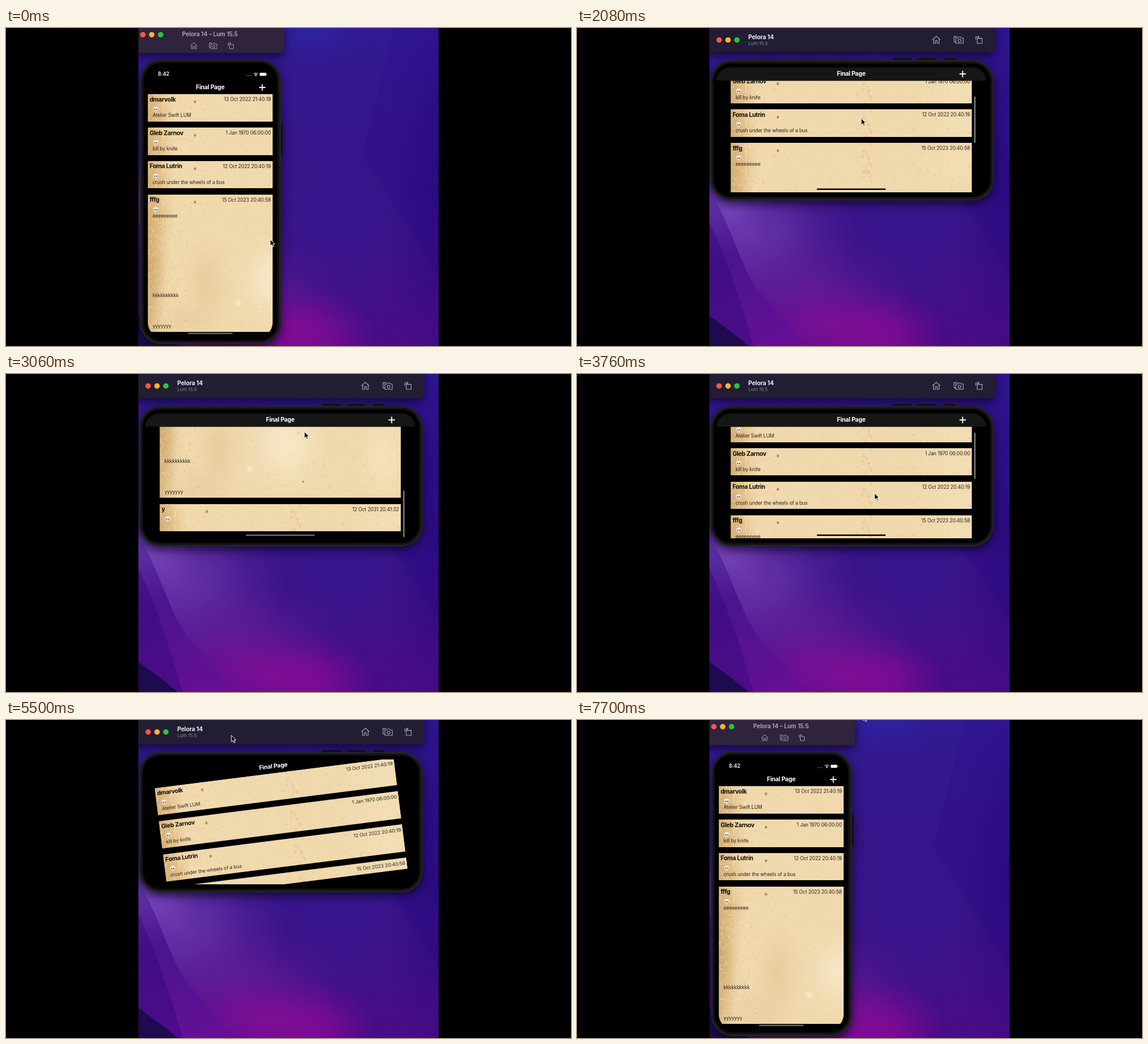
An HTML page with a canvas for the animation above (7800 ms loop, 960x540 px).

```html
<!DOCTYPE html>
<html lang="en">
<head>
<meta charset="utf-8">
<title>Simulator rotation</title>
<style>
html, body { margin: 0; width: 100%; height: 100%; overflow: hidden; background: #000; }
canvas { display: block; width: 960px; height: 540px; }
</style>
</head>
<body>
<canvas id="stage" width="960" height="540"></canvas>
<script>
const ctx = document.getElementById('stage').getContext('2d');
const LOOP = 7800, FONT = 'Inter, "Liberation Sans", sans-serif';
const WHITE = '#fff', INK = '#2a241b', HOME = '#6c6c6c';
const lerp = (a, b, p) => a + (b - a) * p;
const ease = x => (1 - Math.cos(Math.PI * Math.min(1, Math.max(0, x)))) / 2;
const glide = x => 1 - (1 - Math.min(1, Math.max(0, x))) ** 3;

// Interpolate rows of [time, value, value...]
function track(keys, t) {
  let i = 0;
  while (i < keys.length - 2 && t >= keys[i + 1][0]) i++;
  const a = keys[i], b = keys[i + 1];
  const p = ease((t - a[0]) / (b[0] - a[0]));
  return a.slice(1).map((v, k) => lerp(v, b[k + 1], p));
}

function layer(w, h, scale, paint) {
  const c = document.createElement('canvas');
  c.width = w * scale;
  c.height = h * scale;
  const g = c.getContext('2d');
  g.scale(scale, scale);
  paint(g);
  return c;
}

function blob(g, x, y, rx, ry, rgb, alpha) {
  g.save();
  g.translate(x, y);
  g.scale(rx, ry);
  const f = g.createRadialGradient(0, 0, 0, 0, 0, 1);
  [1, .75, .28, 0].forEach((k, i) => f.addColorStop(i / 3, `rgba(${rgb},${alpha * k})`));
  g.fillStyle = f;
  g.fillRect(-1, -1, 2, 2);
  g.restore();
}

function rounded(g, x, y, w, h, r, fill) {
  g.beginPath();
  g.roundRect(x, y, w, h, r);
  g.fillStyle = fill;
  g.fill();
}

function text(s, x, y, size, weight, color, align = 'left', spacing = -.12) {
  ctx.font = `${weight} ${size}px ${FONT}`;
  ctx.letterSpacing = spacing + 'px';
  ctx.textAlign = align;
  ctx.textBaseline = 'middle';
  ctx.fillStyle = color;
  ctx.fillText(s, x, y);
}

const wallpaper = layer(960, 540, 1, g => {
  g.beginPath();
  g.rect(225, 0, 510, 540);
  g.clip();
  const base = g.createLinearGradient(0, 0, 0, 540);
  base.addColorStop(0, '#321a92');
  base.addColorStop(.5, '#361387');
  base.addColorStop(1, '#480b86');
  g.fillStyle = base;
  g.fillRect(225, 0, 510, 540);
  [
    [515, 0, 110, 60, '44,38,170', .6],
    [570, 330, 180, 200, '54,24,146', .6],
    [290, 350, 190, 150, '116,62,178', .75],
    [250, 300, 80, 70, '134,82,200', .6],
    [390, 440, 190, 90, '104,32,152', .65],
    [440, 510, 190, 85, '140,16,152', .75],
    [520, 530, 110, 80, '140,10,150', .6],
    [735, 270, 90, 330, '40,8,124', .6]
  ].forEach(b => blob(g, ...b));
  g.fillStyle = 'rgba(36,4,130,.16)';
  g.beginPath();
  g.moveTo(660, 0);
  g.lineTo(605, 215);
  g.lineTo(735, 420);
  g.lineTo(735, 0);
  g.fill();
  const ridge = g.createLinearGradient(225, 280, 330, 540);
  ridge.addColorStop(0, '#6034a8');
  ridge.addColorStop(.4, '#4a1490');
  ridge.addColorStop(1, '#640f96');
  g.fillStyle = ridge;
  g.beginPath();
  g.moveTo(225, 278);
  g.bezierCurveTo(265, 335, 280, 425, 325, 465);
  g.quadraticCurveTo(355, 500, 385, 540);
  g.lineTo(225, 540);
  g.fill();
  g.fillStyle = 'rgba(52,8,118,.45)';
  g.beginPath();
  g.moveTo(225, 330);
  g.quadraticCurveTo(260, 400, 300, 540);
  g.lineTo(225, 540);
  g.fill();
  g.fillStyle = '#1d0a50';
  g.beginPath();
  g.moveTo(225, 489);
  g.quadraticCurveTo(255, 510, 292, 540);
  g.lineTo(225, 540);
  g.fill();
});

const paper = layer(412, 236, 2, g => {
  let seed = 7;
  const rnd = () => (seed = seed * 16807 % 2147483647) / 2147483647;
  g.fillStyle = '#f0d9ad';
  g.fillRect(0, 0, 412, 236);
  [
    [215, 145, 75, 85, '248,234,202', .9],
    [380, 165, 50, 80, '246,230,192', .75],
    [385, 30, 75, 70, '244,226,186', .6],
    [100, 150, 42, 85, '226,196,144', .5],
    [65, 215, 70, 45, '228,198,148', .45],
    [8, 120, 32, 110, '206,168,108', .6],
    [18, 35, 30, 60, '222,180,118', .6],
    [153, 184, 8, 8, '250,238,208', .9],
    [80, 13, 3, 3.5, '128,86,36', .9],
    [244, 206, 2.5, 2.5, '150,110,60', .9],
    [305, 90, 2.5, 3, '170,125,70', .7]
  ].forEach(b => blob(g, ...b));
  const edge = g.createLinearGradient(0, 0, 30, 0);
  edge.addColorStop(0, 'rgba(190,142,76,.5)');
  edge.addColorStop(1, 'rgba(220,180,120,0)');
  g.fillStyle = edge;
  g.fillRect(0, 0, 30, 236);
  g.fillStyle = 'rgba(250,232,196,.5)';
  g.fillRect(25, 0, 1.2, 60);
  for (let i = 0; i < 1800; i++) {
    const near = rnd() < .4;
    const x = near ? 65 * rnd() ** 2 : rnd() * 412;
    const tone = ['212,172,110', '250,236,204', '230,196,150'][i % 3];
    g.fillStyle = `rgba(${tone},${near ? .3 : .25})`;
    g.fillRect(x, rnd() * 236, 1 + rnd() * 2, 1 + rnd() * 2.5);
  }
  for (let i = 0; i < 18; i++) {
    blob(g, 222 + rnd() * 18, rnd() * 65, 2 + rnd() * 2, 2 + rnd() * 3, '220,184,124', .5);
  }
});

const rows = [
  ['dmarvolk', '13 Oct 2022 21:40:19', ['Atelier Swift LUM']],
  ['Gleb Zarnov', '1 Jan 1970 06:00:00', ['kill by knife']],
  ['Foma Lutrin', '12 Oct 2022 20:40:19', ['crush under the wheels of a bus']],
  ['fffg', '15 Oct 2023 20:40:58', ['eeeeeeeee', 'kkkkkkkkkk', 'yyyyyyy']],
  ['y', '12 Oct 2031 20:41:32', []]
];
const NOTE_Y = [36.5, 171.5, 223.5];

function skull(x, y) {
  rounded(ctx, x - 4, y - 4, 8, 6.5, 3.2, '#f4f1ea');
  rounded(ctx, x - 2.3, y + 1, 4.6, 3, 1, '#dcd6ca');
  rounded(ctx, x - 2.7, y - .8, 2, 2, 1, '#302c28');
  rounded(ctx, x + .7, y - .8, 2, 2, 1, '#302c28');
}

function plus(x, y) {
  ctx.fillStyle = WHITE;
  ctx.fillRect(x - 5.5, y - .9, 11, 1.8);
  ctx.fillRect(x - .9, y - 5.5, 1.8, 11);
}

// Coordinates are relative to the middle of the screen; p = 1 is the wide layout.
function drawApp(p, scroll, settled) {
  const half = lerp(106, 204.8, p), top = lerp(-182.7, -83.6, p), bottom = lerp(229.5, 106, p);
  ctx.save();
  ctx.beginPath();
  ctx.rect(-half, top, half * 2, bottom - top);
  ctx.clip();
  let y = top - scroll;
  for (const [name, date, notes] of rows) {
    const h = notes.length > 1 ? 233.5 : 46.5;
    ctx.drawImage(paper, 0, 0, half * 4, h * 2, -half, y, half * 2, h);
    text(name, -half + 3, y + 9.5, 10.2, 700, '#120e08', 'left', -.3);
    text(date, half - 3, y + 9.5, 8.3, 400, INK, 'right');
    skull(-half + 13.5, y + 25.5);
    notes.forEach((n, i) => text(n, -half + 8, y + NOTE_Y[i], 8.3, 400, INK));
    y += h + 10.3;
  }
  ctx.restore();

  if (scroll > 1) {
    ctx.fillStyle = '#161616';
    ctx.fillRect(-230, -106, 460, 22.4);
    rounded(ctx, 209, lerp(-81, 25, scroll / 283), 2, 79, 1, '#8a8a8a');
  }
  const barY = lerp(-194, -95, p);
  text('Final Page', 0, barY, 10.2, 700, WHITE, 'center', -.25);
  plus(lerp(88.5, 189.3, p), barY);
  if (!settled) return;
  if (p) rounded(ctx, -58.5, 99.6, 117, 2.4, 1.2, scroll > 255 ? HOME : '#080808');
  else {
    rounded(ctx, -38, 222.5, 76, 2.2, 1.1, HOME);
    drawStatus();
  }
}

function drawStatus() {
  text('8:42', -89, -216.5, 8.8, 600, WHITE, 'left', -.1);
  ctx.fillStyle = '#555';
  for (let i = 0; i < 4; i++) ctx.fillRect(61 + i * 2.7, -215, 1.6, 1.6);
  ctx.strokeStyle = WHITE;
  ctx.lineWidth = 1.2;
  for (const r of [2.5, 5]) {
    ctx.beginPath();
    ctx.arc(77.5, -213.5, r, -2.35, -.8);
    ctx.stroke();
  }
  rounded(ctx, 76.6, -215, 1.8, 1.8, .9, WHITE);
  rounded(ctx, 84, -219, 11, 5.2, 1.4, WHITE);
  ctx.fillRect(95.6, -217.3, 1, 2);
}

function drawIcons(xs, y, scale) {
  const shapes = [
    'M-5.5 0L0-5L5.5 0M-4-1V5H-1.2V1H1.2V5H4V-1',
    'M-4-2.5H-1L0-4H3L4-2.5H6.5V5H-4ZM-4 3H-6.5V-4.5H-2M3.4 1.2A2.1 2.1 0 1 1-.8 1.2A2.1 2.1 0 1 1 3.4 1.2',
    'M-2.5-2H4.5V5H-2.5ZM-4.5 0V-4H0M-1.7-5.8L0-4L-1.7-2.2'
  ];
  ctx.strokeStyle = '#aaa5b0';
  ctx.lineWidth = .9;
  shapes.forEach((d, i) => {
    ctx.save();
    ctx.translate(xs[i], y);
    ctx.scale(scale, scale);
    ctx.stroke(new Path2D(d));
    ctx.restore();
  });
}

function drawWindow(wide) {
  ctx.save();
  ctx.beginPath();
  ctx.rect(225, 0, 510, 540);
  ctx.clip();
  ctx.shadowColor = 'rgba(8,0,25,.7)';
  ctx.shadowBlur = 16;
  ctx.shadowOffsetY = 6;
  rounded(ctx, 215, -10, wide ? 495 : 257.5, wide ? 51 : 52.5, 7, wide ? '#231d33' : '#30243d');
  const [x, y, w, h] = wide ? [226, 54, 482.5, 239] : [227.5, 53, 240, 484];
  ctx.fillStyle = '#121214';
  if (wide) [[537, 32], [580, 30], [625, 18]].forEach(b => ctx.fillRect(b[0], 51, b[1], 4));
  else ctx.fillRect(466, 160, 4, 54);
  rounded(ctx, x, y, w, h, 37, '#222225');
  ctx.shadowColor = 'transparent';
  rounded(ctx, x + 3, y + 3, w - 6, h - 6, 34, '#121213');
  rounded(ctx, x + 6.5, y + 6.5, w - 13, h - 13, 30, '#000');
  ctx.restore();

  ['#ff5648', '#fdb827', '#2bc53a'].forEach((c, i) => {
    const cx = (wide ? 241.5 : 232.5) + i * 15.1, cy = wide ? 20.3 : 11.3;
    rounded(ctx, cx - 4.6, cy - 4.6, 9.2, 9.2, 4.6, c);
  });
  if (wide) {
    text('Pelora 14', 291, 15.5, 10, 700, '#f0edf2');
    text('Lum 15.5', 291, 27, 8, 400, '#8b8594', 'left', 0);
    drawIcons([610.5, 648.5, 683], 20, 1.2);
  } else {
    text('Pelora 14 – Lum 15.5', 346.5, 11, 10, 600, '#b3abb9', 'center', -.1);
    drawIcons([319, 352, 382], 30, 1);
  }
}

// Moments at which the rotate button is pressed, and the time a quarter turn takes
const PRESS = [498, 4500, 4943, 6300], QUARTER = 320;

// [wide window, wide layout amount, content angle in degrees, settled]
function pose(t) {
  const turn = (i, time) => ease((t - PRESS[i]) / time);
  if (t < PRESS[0]) return [false, 0, 0, true];
  if (t < PRESS[1]) {
    const e = turn(0, QUARTER);
    return [true, e, 90 * (1 - e), e === 1];
  }
  if (t < PRESS[2]) return [false, 1, 90, true];
  if (t < PRESS[3]) {
    const e = turn(2, QUARTER * 2);
    return [true, 1, -180 * (1 - e), e === 1];
  }
  const e = turn(3, QUARTER);
  return [false, 1 - e, 90 * (1 - e), e === 1];
}

const cursorKeys = [
  [0, 449, 359], [430, 382, 30], [720, 384, 33], [900, 384, 33], [1500, 455, 218],
  [1840, 455, 218], [2300, 507, 98], [3180, 507, 98], [3480, 500, 208], [3700, 500, 208],
  [4250, 683, 20], [4550, 683, 20], [4800, 462, 34], [4920, 383, 26], [5600, 383, 26],
  [6150, 683, 20], [6700, 683, 20], [7200, 600, 60], [7700, 486, -10]
];

// The list follows the finger while dragged, then glides to its end.
function scrollAt(t) {
  const dragged = track(cursorKeys, t)[1];
  if (t < 1840) return 0;
  if (t < 2300) return 218 - dragged;
  if (t < 3180) return lerp(120, 283, glide((t - 2300) / 550));
  if (t < 3480) return 283 - (dragged - 98);
  return lerp(173, 0, glide((t - 3480) / 550));
}

const arrow = new Path2D('M0 0V11L2.6 8.8L4.3 12.8L6.2 12L4.5 8.1H8Z');

function drawCursor(t) {
  const [x, y] = track(cursorKeys, t);
  ctx.save();
  ctx.translate(x, y);
  ctx.fillStyle = '#080808';
  ctx.strokeStyle = '#f4f0f4';
  ctx.lineWidth = 1;
  ctx.fill(arrow);
  ctx.stroke(arrow);
  ctx.restore();
}

function draw(now) {
  const t = now % LOOP;
  const [wide, p, angle, settled] = pose(t);
  ctx.fillStyle = '#000';
  ctx.fillRect(0, 0, 960, 540);
  ctx.drawImage(wallpaper, 0, 0);
  drawWindow(wide);

  const [w, h] = wide ? [459, 212] : [212, 459];
  ctx.save();
  ctx.translate(wide ? 466 : 347, wide ? 173 : 295);
  ctx.beginPath();
  ctx.roundRect(-w / 2, -h / 2, w, h, 24);
  ctx.clip();
  ctx.rotate(angle * Math.PI / 180);
  drawApp(p, scrollAt(t), settled);
  ctx.restore();
  drawCursor(t);
}

const start = performance.now();
function tick() {
  draw(performance.now() - start);
  requestAnimationFrame(tick);
}
tick();
</script>
</body>
</html>
```
